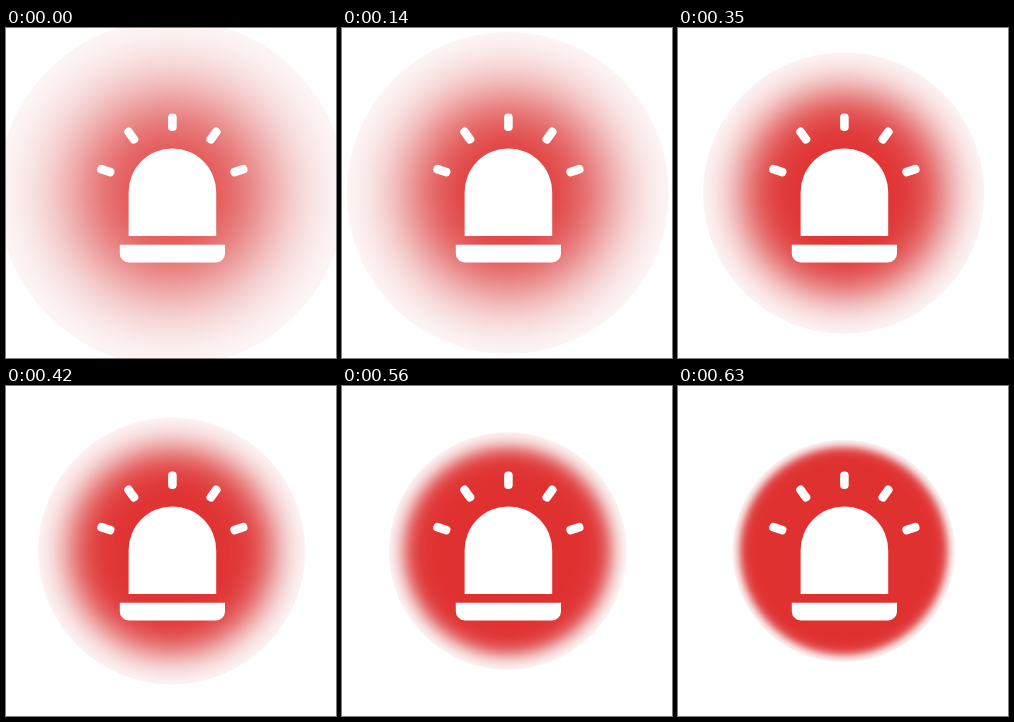
Write an HTML page with a canvas that moves like this. It is 330x330 px and loops after 700 ms.

```html
<!DOCTYPE html>
<html lang="en">
<head>
<meta charset="utf-8">
<title>Siren</title>
<style>
  html, body { margin: 0; width: 100%; height: 100%; overflow: hidden; background: #fff; }
  canvas { display: block; width: 100vw; height: 100vh; }
</style>
</head>
<body>
<canvas id="stage" width="330" height="330"></canvas>
<script>
const ctx = document.getElementById('stage').getContext('2d');
const LOOP = 700, TICK = 70;
const GLOW = { x: 165.7, y: 165, disc: 104 };
const DOME = { x: 166.4, y: 164.2, r: 43.8, bottom: 208 };

// The glow closes in slightly faster over time; early steps last two ticks.
function glowRadius(time) {
  let k = Math.floor((time % LOOP) / TICK);
  if (k < 4) k -= k % 2;
  return 174 - 6.3 * k - 0.075 * k * k;
}

// A blurred disc, cut off where it has almost faded out.
function drawGlow(radius) {
  const { x, y, disc } = GLOW;
  const sigma = (radius - disc) / 1.5;
  const mid = disc - sigma * sigma / (2 * disc);
  const peak = 1 - Math.exp(-disc * disc / (2 * sigma * sigma));
  const fill = ctx.createRadialGradient(x, y, 0, x, y, radius);
  const stops = 60;
  for (let i = 0; i <= stops; i++) {
    const p = i / stops;
    const alpha = peak / (1 + Math.exp(1.702 * (p * radius - mid) / sigma));
    const red = 224 - 14 * (1 - alpha);
    fill.addColorStop(p, `rgba(${red.toFixed()}, 49, 49, ${alpha.toFixed(4)})`);
  }
  ctx.fillStyle = fill;
  ctx.beginPath();
  ctx.arc(x, y, radius, 0, Math.PI * 2);
  ctx.fill();
}

function drawSiren() {
  const { x, y, r, bottom } = DOME;
  ctx.fillStyle = '#fff';

  ctx.beginPath();
  ctx.arc(x, y, r, Math.PI, 0);
  ctx.lineTo(x + r, bottom);
  ctx.lineTo(x - r, bottom);
  ctx.fill();

  ctx.beginPath();
  ctx.roundRect(x - 52.6, 216.8, 105.2, 17.6, [0, 0, 9, 9]);
  ctx.fill();

  // Five rays fan out around the dome.
  for (let i = -2; i <= 2; i++) {
    ctx.save();
    ctx.translate(x, y);
    ctx.rotate(i * Math.PI / 5);
    ctx.beginPath();
    ctx.roundRect(-4.3, -78.7, 8.6, 17.5, 4);
    ctx.fill();
    ctx.restore();
  }
}

function render(time) {
  ctx.fillStyle = '#fff';
  ctx.fillRect(0, 0, 330, 330);
  drawGlow(glowRadius(time));
  drawSiren();
}

const begin = performance.now();
function tick() {
  render(performance.now() - begin);
  requestAnimationFrame(tick);
}
tick();
</script>
</body>
</html>
```
